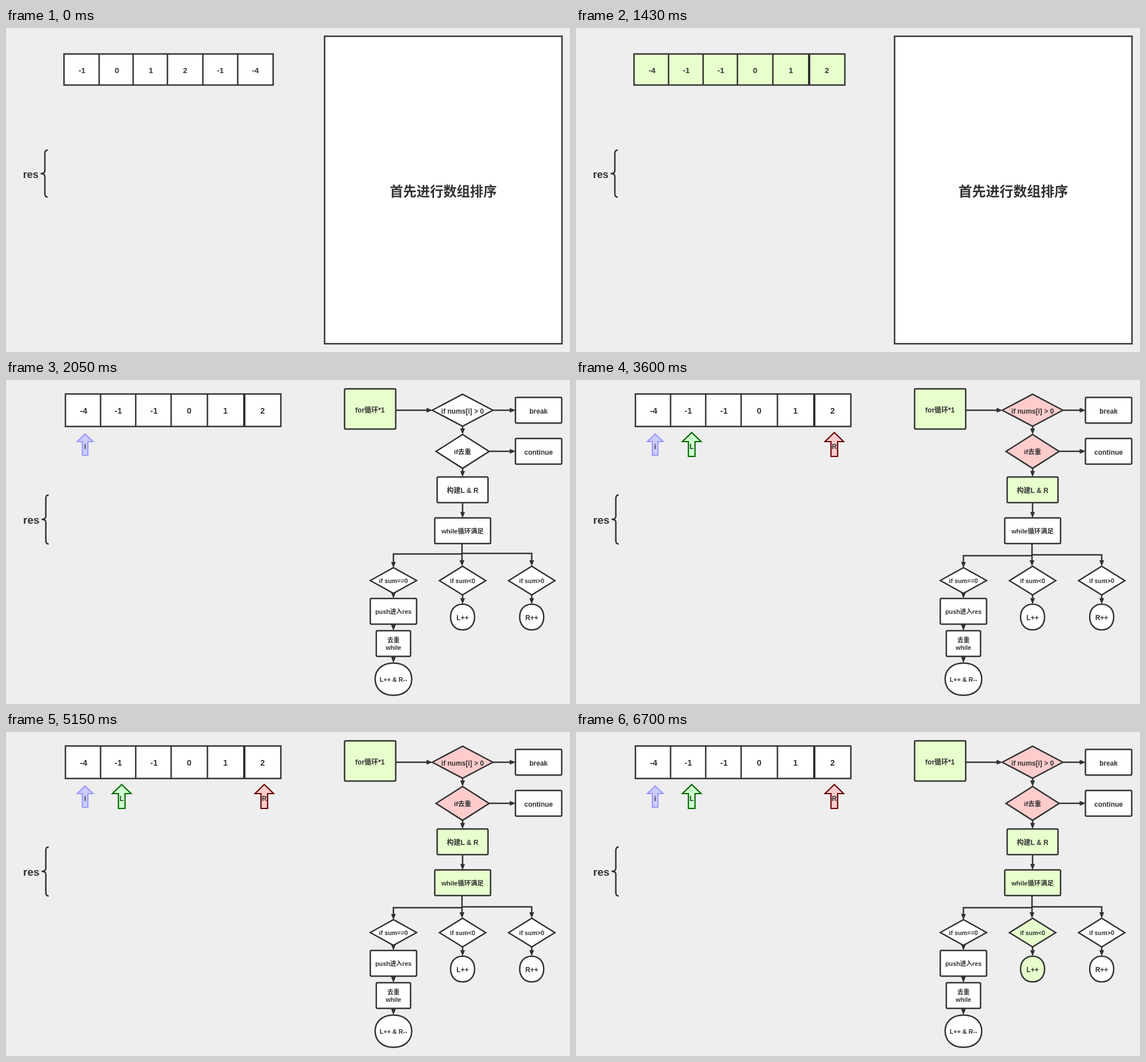
These frames come from a looping animation (987 px wide and 568 px high, 8 s). An HTML page:

```html
<!DOCTYPE html>
<html lang="zh">
<head>
<meta charset="utf-8">
<style>
  html, body { margin: 0; width: 100%; height: 100%; overflow: hidden; background: #eee; }
  svg { display: block; width: 987px; height: 568px; }
  text {
    font-family: "Liberation Sans", Arial, "Noto Sans CJK SC", "Noto Sans CJK", sans-serif;
    font-weight: 700; fill: #323232; text-anchor: middle; white-space: pre;
  }
</style>
</head>
<body>
<svg id="stage" viewBox="0 0 987 568"></svg>
<script>
const stage = document.getElementById('stage');
const INK = '#323232', WHITE = '#fff', GREEN = '#e6ffcc', PINK = '#ffcccc';
const LOOP = 8000, STARTS = [0, 500, 2050, 3600, 5150, 6700];

const path = (d, fill = 'none', stroke = INK, width = 2.5) =>
  `<path d="${d}" fill="${fill}" stroke="${stroke}" stroke-width="${width}"/>`;
const label = (str, x, y, size = 12) => `<text x="${x}" y="${y}" font-size="${size}">${str
  .replace(/&/g, '&amp;').replace(/</g, '&lt;')}</text>`;
const box = (x1, y1, x2, y2, fill = WHITE, r = 2) =>
  `<rect x="${x1}" y="${y1}" width="${x2 - x1}" height="${y2 - y1}" rx="${r}" fill="${fill}" stroke="${INK}" stroke-width="2.5"/>`;
const diamond = (x, y, rx, ry, fill = WHITE) =>
  path(`M${x - rx} ${y}L${x} ${y - ry}L${x + rx} ${y}L${x} ${y + ry}Z`, fill);

// Slightly squarish oval
function oval(x, y, rx, ry, fill = WHITE) {
  const a = rx * 0.6, b = ry * 0.6;
  return path(`M${x - rx} ${y}c0 ${-b} ${rx - a} ${-ry} ${rx} ${-ry}s${rx} ${ry - b} ${rx} ${ry}` +
    `s${a - rx} ${ry} ${-rx} ${ry}s${-rx} ${b - ry} ${-rx} ${-ry}Z`, fill);
}

// Polyline whose last segment carries an arrow head
function arrow(...pts) {
  const [x, y] = pts.at(-1), [px, py] = pts.at(-2);
  const angle = Math.atan2(y - py, x - px) * 180 / Math.PI;
  const end = angle ? [x, y - 6] : [x - 6, y];
  return path('M' + [...pts.slice(0, -1), end].map(p => p.join(' ')).join('L')) +
    `<path d="M0 0L-10.5 -4.2V4.2Z" fill="${INK}" transform="translate(${x} ${y}) rotate(${angle})"/>`;
}

function pointer(name, x, top, bottom, head, shaft, fill, stroke) {
  const neck = 108;
  return path(`M${x} ${top}L${x + head} ${neck}H${x + shaft}V${bottom}H${x - shaft}V${neck}H${x - head}Z`, fill, stroke, 2.2) +
    label(name, x, 121);
}

function cells({ edges, top, bottom, values, centers, base, size, fill = WHITE, thick }) {
  const lines = edges.slice(1, -1).map((x, i) =>
    path(`M${x} ${top}V${bottom}`, 'none', INK, thick && i === 4 ? 4 : 2.5)).join('');
  return box(edges[0], top, edges.at(-1), bottom, fill, 0) + lines +
    values.map((v, i) => label(v, centers[i], base, size)).join('');
}

function result(x, top, bottom, mid, textX, base, size) {
  return label('res', textX, base, size) +
    path(`M${x + 5} ${top}Q${x} ${top} ${x} ${top + 6}V${mid - 5}Q${x} ${mid} ${x - 7.5} ${mid}` +
      `Q${x} ${mid} ${x} ${mid + 5}V${bottom - 6}Q${x} ${bottom} ${x + 5} ${bottom}`);
}

function intro(sorted) {
  const row = sorted
    ? { edges: [101.5, 162, 222.5, 282.5, 344.5, 408, 470.5], values: [-4, -1, -1, 0, 1, 2],
        centers: [133, 193, 253.5, 313.5, 376, 439], fill: GREEN, thick: true }
    : { edges: [101.5, 163, 222.5, 282.5, 344.5, 405.5, 467.5], values: [-1, 0, 1, 2, -1, -4],
        centers: [133, 194, 253.5, 313.5, 375, 436.5] };
  row.values = row.values.map(String);
  return cells({ ...row, top: 45.5, bottom: 100, base: 78.7, size: 13.6 }) +
    result(68, 214, 296.5, 255.3, 43.3, 263, 18.2) +
    box(557.5, 14.5, 973, 553.5, WHITE, 0) +
    label('首先进行数组排序', 765.3, sorted ? 295 : 294.5, sorted ? 24 : 23.4);
}

function chart(level) {
  const on = (from, color = GREEN) => level >= from ? color : WHITE;
  const [leftY, rightY] = level ? [308, 306.5] : [305, 304];

  const row = cells({
    edges: [104, 165.5, 227, 289, 352.5, 417, 481], top: 24.5, bottom: 81.5, base: 59.2, size: 14.4,
    values: ['-4', '-1', '-1', '0', '1', '2'], centers: [135.8, 196.5, 259, 320.5, 384, 449], thick: true
  });
  const pointers = pointer('i', 138.5, 94.5, 132, 13.7, 4.8, '#ccccff', '#9999ff') + (level
    ? pointer('L', 202.5, 92, 134, 16.3, 5.8, '#ccffcc', '#006600') +
      pointer('R', 452, 92, 134, 16.3, 5.8, PINK, '#660000') : '');

  const shapes = [
    box(592.5, 15.5, 682, 86, GREEN),
    diamond(799, 53, 53, 28.2, on(1, PINK)),
    box(891.5, 30.5, 972.5, 75.5),
    diamond(799, 125.2, 46.5, 29.7, on(1, PINK)),
    box(891.5, 102.5, 972.5, 147.5),
    box(754.5, 170, 843.5, 215, on(1)),
    box(750.3, 241.7, 848, 286.7, on(2)),
    diamond(678, 351.5, 40.5, 22.5),
    diamond(799, 351.7, 40.5, 25.2, on(3)),
    diamond(920, 351.7, 40.5, 25.2),
    box(637.5, 383, 718.5, 428),
    box(648, 439.5, 708, 484.5),
    oval(678, 524.5, 32, 28.2),
    oval(799, 415.5, 21, 22.5, on(3)),
    oval(920, 415.5, 21, 22.5)
  ];
  const links = [
    arrow([682, 53], [746.5, 53]), arrow([852, 53], [892, 53]),
    arrow([845.5, 125], [892, 125]), arrow([799, 81], [799, 95.5]),
    arrow([799, 155], [799, 170]), arrow([799, 215], [799, 242]),
    arrow([798, 286], [798, 326.5]),
    arrow([798, leftY], [678, leftY], [678, 329.5]),
    arrow([798, rightY], [920, rightY], [920, 326.5]),
    arrow([678, 373], [678, 383]), arrow([678, 428], [678, 439.5]),
    arrow([678, 484.5], [678, 496]),
    arrow([799, 377], [799, 393]), arrow([920, 377], [920, 393])
  ];
  const labels = [
    ['for循环*1', 637, 56.8], ['if nums[i] > 0', 799, 59], ['break', 932, 59.3],
    ['if去重', 799, 130.3, 11.5], ['continue', 932, 131.3], ['构建L & R', 799, 198.3],
    ['while循环满足', 799, 269.2, 11.4], ['if sum==0', 678, 356, 10.8],
    ['if sum<0', 799, 356, 10.8], ['if sum>0', 920, 356, 10.8],
    ['push进入res', 678, 409.7, 10.8], ['去重', 678, 460, 10.8], ['while', 678, 473, 10.8],
    ['L++ & R--', 678, 528.7, 10.8], ['L++', 799, 421.3], ['R++', 920, 421.3]
  ];
  return row + pointers + result(69.7, 201.5, 287.5, 244.3, 44.3, 252.3, 19) +
    shapes.join('') + links.join('') + labels.map(l => label(...l)).join('');
}

let shown = -1;
function render(time) {
  const t = time % LOOP;
  const step = STARTS.findLastIndex(start => t >= start);
  if (step === shown) return;
  shown = step;
  stage.innerHTML = step < 2 ? intro(step === 1) : chart(step - 2);
}

const begin = performance.now();
function tick() {
  render(performance.now() - begin);
  requestAnimationFrame(tick);
}
tick();
</script>
</body>
</html>
```
